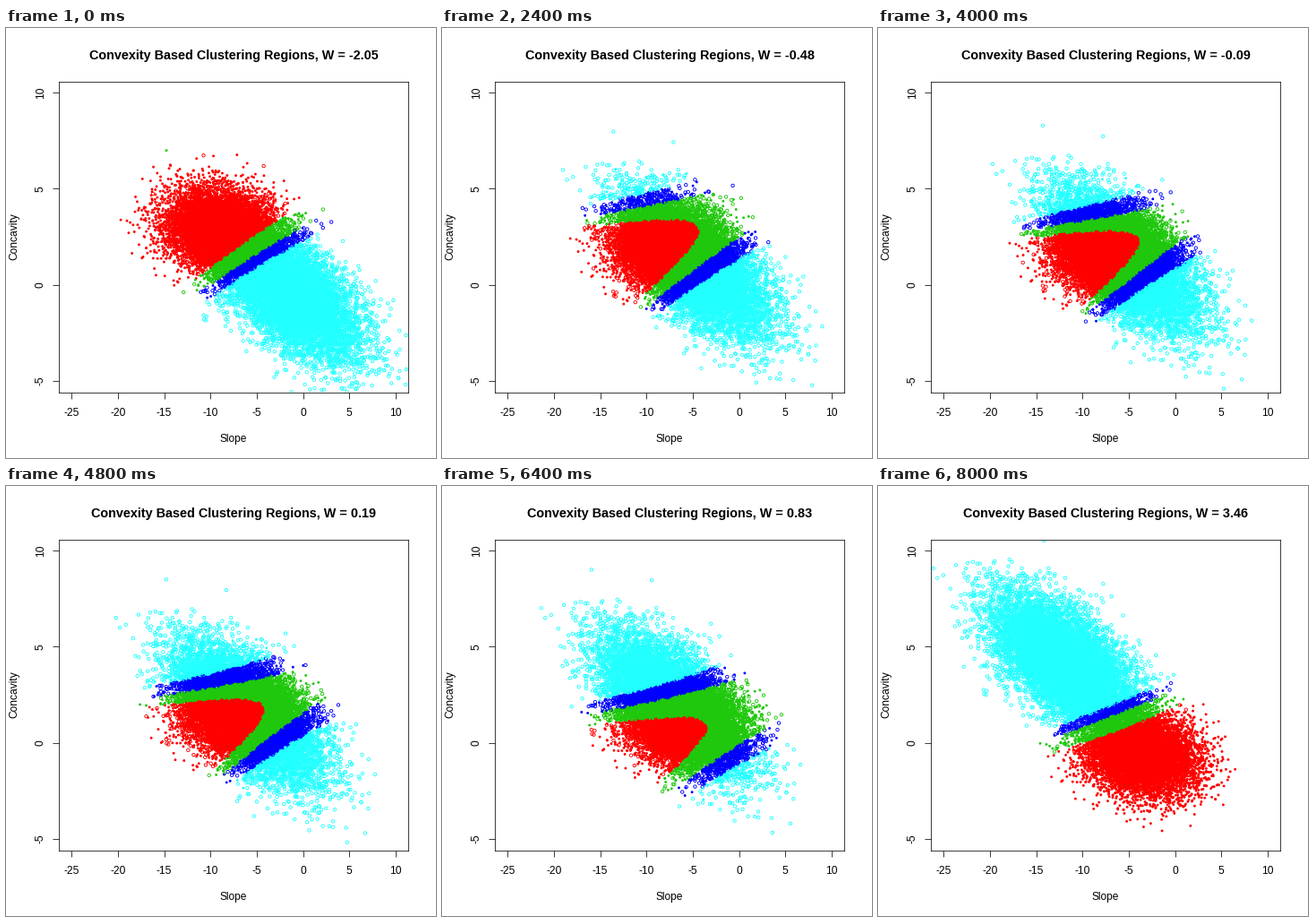
Recreate the animation shown at these times as a matplotlib script. Size 480 px wide and 480 px high, loop 8.8 s.

```python
import numpy as np
import matplotlib.pyplot as plt
from matplotlib.animation import FuncAnimation

plt.rcParams["font.family"] = ["Liberation Sans", "DejaVu Sans"]
plt.rcParams["axes.unicode_minus"] = False

SIZE, DPI = 480, 72
L, R, T, B = 58.7, 449.4, 59.52, 406.56
# Minimum, deciles and maximum of W
STEPS = [-2.05, -1.28, -0.92, -0.48, -0.28, -0.09, 0.19, 0.51, 0.83, 1.19, 3.46]
COUNT = 10000
COLORS = np.array([[255, 0, 0, 255], [31, 200, 12, 255],
                   [0, 0, 255, 255], [34, 255, 255, 255]]) / 255


class Cluster:
    """Gaussian cloud whose centre drifts linearly with W."""

    def __init__(self, center, drift, sx, sy, rho, seed):
        self.center, self.drift = np.array(center), np.array(drift)
        cov = np.array([[sx * sx, rho * sx * sy], [rho * sx * sy, sy * sy]])
        self.inv = np.linalg.inv(cov)
        self.log_det = np.log(np.linalg.det(cov))
        rng = np.random.default_rng(seed)
        self.noise = rng.multivariate_normal((0, 0), cov, COUNT)

    def mean(self, w):
        return self.center + w * self.drift

    def points(self, w):
        return self.mean(w) + self.noise

    def log_pdf(self, pts, w):
        d = pts - self.mean(w)
        return -0.5 * (np.einsum("ij,jk,ik->i", d, self.inv, d) + self.log_det)


wide = Cluster((-5.6, 1.37), (-1.8, 0.79), 3.85, 1.76, -0.61, seed=7)
tight = Cluster((-6.84, 1.58), (0.93, -0.62), 2.93, 1.06, -0.15, seed=11)


def classify(pts, w):
    """Colour index from the log-likelihood ratio: 0 is surely tight, 3 surely wide."""
    score = tight.log_pdf(pts, w) - wide.log_pdf(pts, w)
    cuts = (0.28 + 0.4 * abs(w), -0.2, -1 - 0.15 * abs(w))
    return sum((score < c).astype(int) for c in cuts)


fig = plt.figure(figsize=(SIZE / DPI, SIZE / DPI), dpi=DPI, facecolor="white")
ax = fig.add_axes([L / SIZE, 1 - B / SIZE, (R - L) / SIZE, (B - T) / SIZE])
ax.set(xlim=(-26.4, 11.4), ylim=(-5.6, 10.6))
xticks, yticks = range(-25, 11, 5), range(-5, 11, 5)
ax.set_xticks(xticks)
ax.set_yticks(yticks)
ax.tick_params(length=7, width=0.75, labelbottom=False, labelleft=False)
for spine in ax.spines.values():
    spine.set_linewidth(0.75)


def label(x, y, text, size=12, **kw):
    return fig.text(x / SIZE, 1 - y / SIZE, text, fontsize=size, ha="center",
                    va="baseline", rotation_mode="anchor", **kw)


for v in xticks:
    label(L + (v + 26.4) / 37.8 * (R - L), 433, str(v))
for v in yticks:
    label(42, B - (v + 5.6) / 16.2 * (B - T), str(v), rotation=90)
label((L + R) / 2, 462, "Slope")
label(12.5, (T + B) / 2, "Concavity", rotation=90)
title = label((L + R) / 2, 35, "", 14.4, weight="bold")

rings = ax.scatter(*wide.points(0).T, s=3.4 ** 2, linewidths=0.9, facecolors="none")
dots = ax.scatter(*tight.points(0).T, s=2.9 ** 2, linewidths=0)


def update(i):
    w = STEPS[i]
    title.set_text(f"Convexity Based Clustering Regions, W = {w:.2f}")
    for cluster, marks, paint in ((wide, rings, rings.set_edgecolor),
                                  (tight, dots, dots.set_facecolor)):
        pts = cluster.points(w)
        marks.set_offsets(pts)
        paint(COLORS[classify(pts, w)])
    return rings, dots, title


anim = FuncAnimation(fig, update, frames=len(STEPS), interval=800,
                     repeat=True, repeat_delay=0, blit=False)
plt.show()
```
